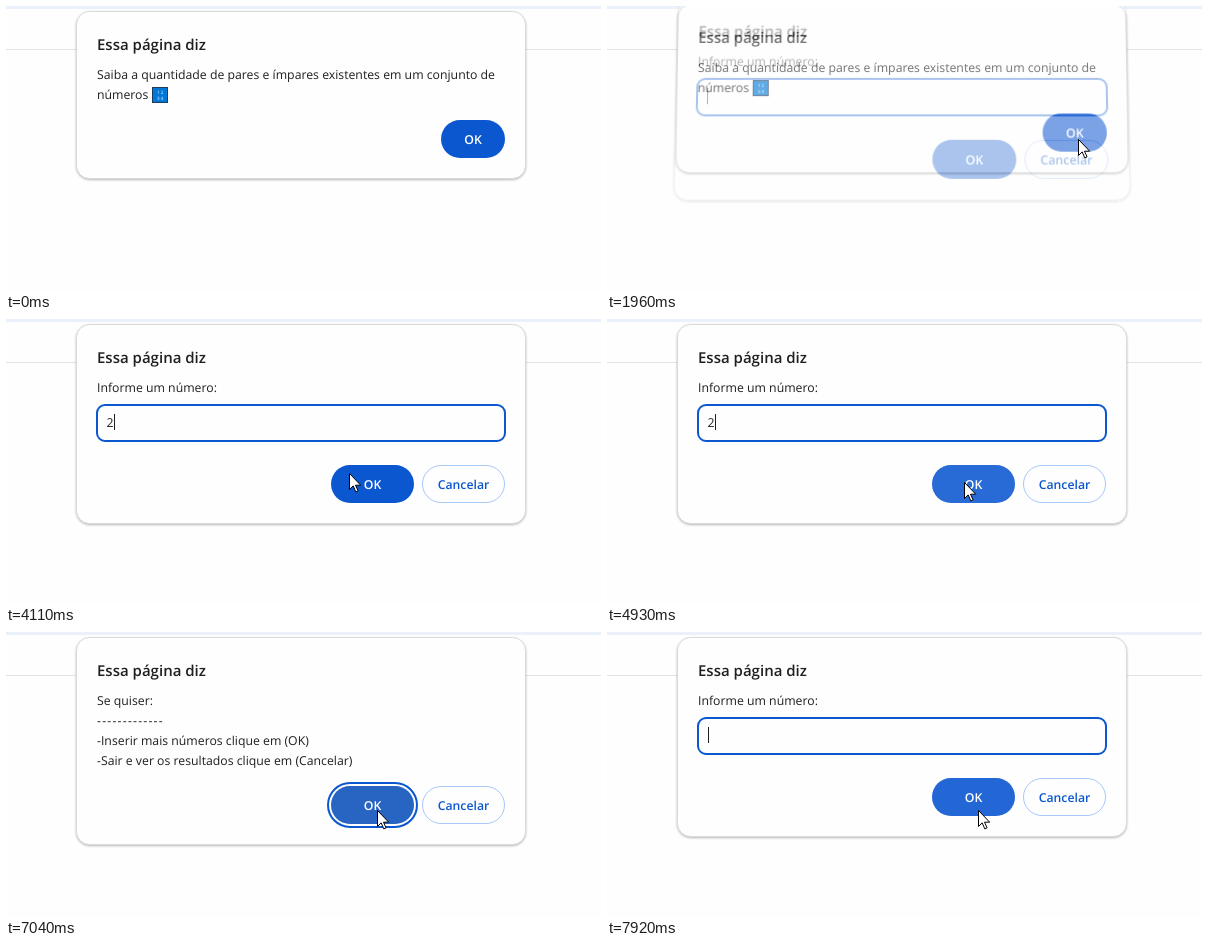
Animation of 595x285 px, one loop 8000 ms. Source, as an HTML page:

```html
<!DOCTYPE html>
<html lang="pt-BR">
<head>
<meta charset="utf-8">
<title>Pares e ímpares</title>
<style>
  html, body { margin: 0; width: 100%; height: 100%; overflow: hidden; background: #fefefe; }
  svg { position: absolute; left: 0; top: 0; width: 595px; height: 285px; overflow: hidden; }
  .dialog { overflow: visible; transform-origin: 295px 5px; }
  .panel { fill: #fefefe; stroke: #d9dadc; filter: drop-shadow(0 1.5px 1.2px rgba(0, 0, 0, .28)); }
  text { font: 12.27px "Open Sans", "Noto Sans", sans-serif; fill: #1f1f1f; text-rendering: geometricPrecision; white-space: pre; }
  .title { font-size: 15px; font-weight: 600; }
  .label { font-weight: 600; text-anchor: middle; fill: #fff; }
  .rule { letter-spacing: 1.2px; }
  .tiny { font-size: 4.5px; fill: #fff; }
  .primary { fill: #0b57d0; }
  .focused { fill: #0a4fba; }
  .outline { fill: #fefefe; stroke: #a8c7fa; }
  .blue { fill: #0b57d0; }
  .ring { fill: none; stroke: #0b57d0; stroke-width: 2; }
  .hover { fill: #fff; opacity: 0; }
  #cursor { z-index: 9; }
</style>
</head>
<body>
<svg><path fill="#eaf1fb" d="M0 0h595v3H0z"/><path fill="#e1e3e7" d="M0 43h595v1H0z"/></svg>
<svg id="cursor"><path fill="#fff" stroke="#000" d="M.5.5v16l3.7-3.6 2.6 6 2.3-1-2.6-5.7h5.2z"/></svg>
<script>
const LOOP = 8000, CAPTURE_STEP = 67.4, FADE = 180;

const text = (x, y, value, cls = '') => `<text x="${x}" y="${y}" class="${cls}">${value}</text>`;
const box = (x, y, w, h, r, cls) => `<rect x="${x}" y="${y}" width="${w}" height="${h}" rx="${r}" class="${cls}"/>`;
const okButton = (x, y, w, cls = 'primary') =>
  box(x, y, w, 38, 19, cls) + box(x, y, w, 38, 19, 'hover') + text(x + w / 2, y + 23.6, 'OK', 'label');
const cancelButton = y =>
  box(416.5, y + .5, 82, 37, 18.5, 'outline') + text(457.5, y + 23.6, 'Cancelar', 'label blue');

function makeDialog(height, lines, extra) {
  const svg = document.createElementNS('http://www.w3.org/2000/svg', 'svg');
  svg.setAttribute('class', 'dialog');
  svg.innerHTML = box(70.5, 5.5, 449, height, 13, 'panel') + text(91, 43.7, 'Essa página diz', 'title') +
    lines.map((line, i) => text(91, 73 + 20 * i, line, line.startsWith('--') ? 'rule' : '')).join('') + extra;
  document.body.append(svg);
  return svg;
}

const notice = makeDialog(167,
  ['Saiba a quantidade de pares e ímpares existentes em um conjunto de', 'números'],
  '<rect x="146.5" y="81.5" width="15" height="15" fill="#0078d7" stroke="#1d3c5c"/>' +
  text(151, 88, '1 2', 'tiny') + text(151, 93.5, '3 4', 'tiny') + okButton(435, 114, 64));
const prompt = makeDialog(199, ['Informe um número:'],
  box(91, 86, 408, 36, 8, 'ring') + text(100.6, 107.7, '2', 'digit') +
  '<rect class="caret" y="95" width="1" height="16" fill="#1f1f1f"/>' +
  okButton(325, 146, 83) + cancelButton(146));
const confirm = makeDialog(207,
  ['Se quiser:', '-------------', '-Inserir mais números clique em (OK)', '-Sair e ver os resultados clique em (Cancelar)'],
  box(322, 151, 89, 44, 22, 'ring') + okButton(325, 154, 83, 'focused') + cancelButton(154));

const dialogs = [notice, prompt, confirm];
const shows = [[0, notice], [1892, prompt], [4990, confirm], [7645, prompt]];
const hovers = [[1000, notice], [4110, prompt], [6860, confirm], [7790, prompt]];
const caretResets = [1890, 3830, 7645];
const cursorPath = [
  [390, 573, 266], [720, 470, 165], [900, 403, 101], [1160, 471, 133], [3760, 471, 133],
  [4090, 336, 155], [4290, 344, 172], [4530, 357, 163], [5010, 357, 163], [5350, 352, 247],
  [6480, 352, 247], [7030, 371, 178], [LOOP, 371, 178]
];

const clamp = v => Math.max(0, Math.min(1, v));
const smooth = v => v * v * (3 - 2 * v);

function cursorAt(t) {
  const i = Math.max(1, cursorPath.findIndex(key => key[0] > t));
  const [t0, x0, y0] = cursorPath[i - 1], [t1, x1, y1] = cursorPath[i];
  const k = smooth(clamp((t - t0) / (t1 - t0)));
  return [x0 + (x1 - x0) * k, y0 + (y1 - y0) * k].map(Math.round);
}

// Dialogs tip about their top edge while sliding in or out.
function pose(svg, away, opacity, layer) {
  svg.style.display = opacity > 0 ? '' : 'none';
  svg.style.opacity = opacity;
  svg.style.zIndex = layer;
  svg.style.transform = away ? `perspective(500px) translateY(${-20 * away}px) rotateX(${5 * away}deg) scale(${1 - .01 * away})` : 'none';
}

function render(t) {
  const current = shows.findLastIndex(show => show[0] <= t);
  const progress = current ? clamp((t - shows[current][0]) / FADE) : 1;
  dialogs.forEach(d => pose(d, 0, 0, 0));
  if (current) pose(shows[current - 1][1], progress, 1 - progress ** 3, 1);
  pose(shows[current][1], 1 - progress, progress, 2);

  hovers.forEach(([start, dialog], i) => {
    if (i < 3 || t >= shows[3][0]) {
      dialog.querySelector('.hover').style.opacity = .12 * clamp((t - start) / 120);
    }
  });

  const typed = t >= 3830 && t < 7645;
  const reset = caretResets.findLast(time => time <= t) ?? 0;
  const caret = prompt.querySelector('.caret');
  caret.setAttribute('x', typed ? 108 : 101);
  caret.style.opacity = Math.floor((t - reset) / 530) % 2 ? 0 : 1;
  prompt.querySelector('.digit').style.opacity = typed ? 1 : 0;

  const cursor = document.getElementById('cursor');
  cursor.style.display = t < 385 ? 'none' : '';
  cursor.firstChild.setAttribute('transform', `translate(${cursorAt(t)})`);
}

function tick() {
  const t = performance.now() % LOOP;
  render(Math.floor(t / CAPTURE_STEP) * CAPTURE_STEP);
  requestAnimationFrame(tick);
}
tick();
</script>
</body>
</html>
```
